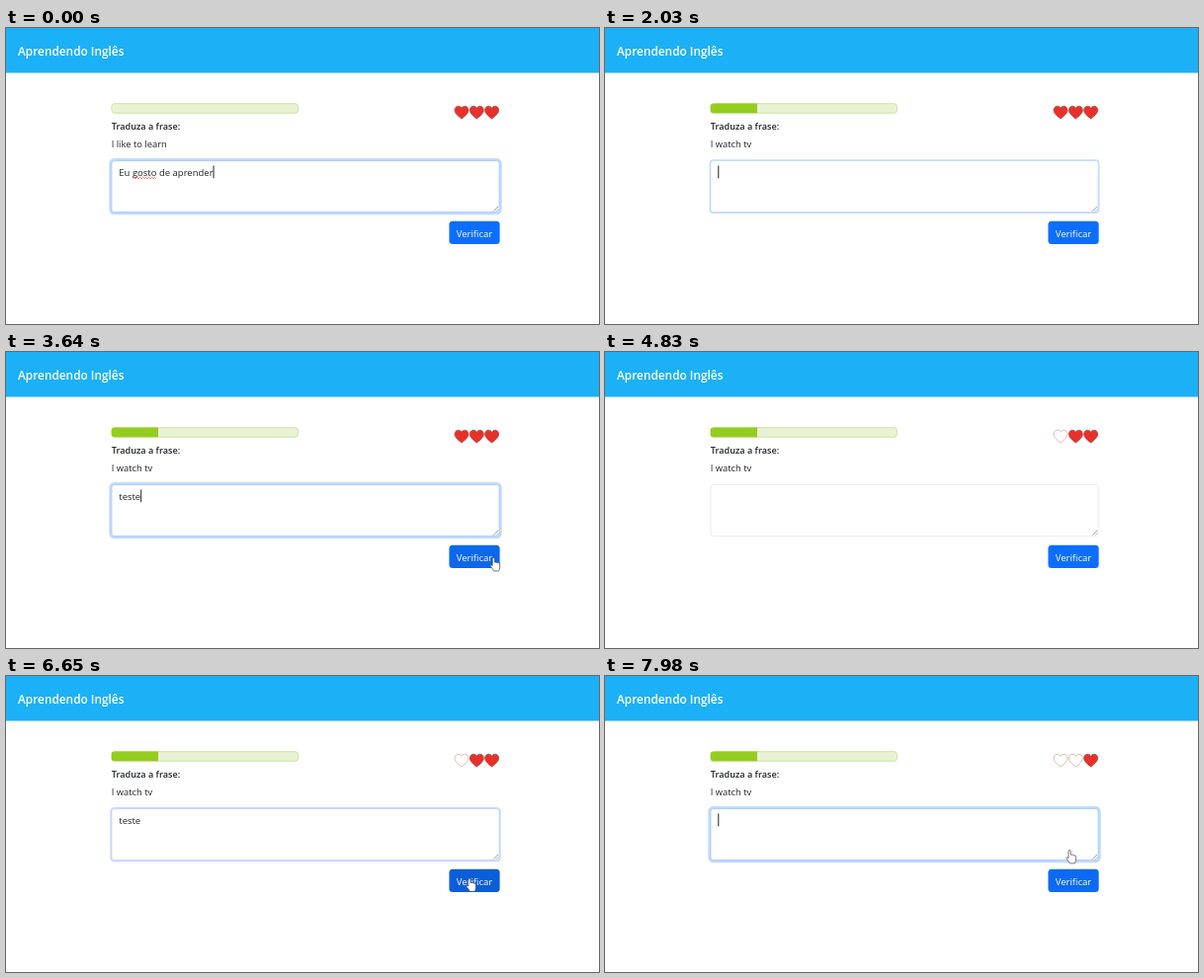
Write an HTML page that moves like this. It is 600 px wide and 300 px high and loops after 8000 ms.

```html
<!DOCTYPE html>
<html lang="pt">
<head>
<meta charset="utf-8">
<title>Aprendendo Inglês</title>
<style>
html, body { margin: 0; width: 100%; height: 100%; overflow: hidden; background: #fff; }
svg { display: block; width: 600px; height: 300px; }
text { font: 9.4px "Open Sans", "Noto Sans", sans-serif; fill: #212529; white-space: pre; }
.title { font-size: 11.85px; font-weight: 600; fill: #fff; }
.label { font-size: 9.15px; font-weight: 600; }
#input { font-size: 9.5px; }
.button { font-size: 9.5px; fill: #fff; text-anchor: middle; }
#pointer path { fill: #fff; stroke: #444; stroke-width: .7; stroke-linejoin: round; }
</style>
</head>
<body>
<svg viewBox="0 0 600 300">
  <defs>
    <path id="heart" d="M0 6.5C-4 3.3-7 .6-7-2.3C-7-4.8-5.2-6.4-3.3-6.4C-1.8-6.4-.6-5.5 0-4.3C.6-5.5 1.8-6.4 3.3-6.4C5.2-6.4 7-4.8 7-2.3C7 .6 4 3.3 0 6.5Z"/>
  </defs>
  <rect width="600" height="45.5" fill="#1cb0f6"/>
  <text class="title" x="12" y="28">Aprendendo Inglês</text>

  <rect x="106.9" y="76.7" width="188.6" height="9.5" rx="3" fill="#e9f3d3" stroke="#c8e29a" stroke-width=".9"/>
  <path id="bar" d="M154 76.4V86.2H109.6Q106.8 86.2 106.8 83.4V79.2Q106.8 76.4 109.6 76.4Z" fill="#94cd1f"/>
  <g id="hearts" stroke-width=".8"></g>

  <text class="label" x="106.7" y="102.7">Traduza a frase:</text>
  <text id="phrase" x="106.7" y="121.2"></text>

  <rect id="ring" x="106.6" y="134.3" width="392.8" height="52.6" rx="3" fill="none" stroke="#c2dbfe"/>
  <rect id="box" x="106.9" y="134.6" width="392.2" height="52" rx="2.6" fill="#fff" stroke-width=".8"/>
  <path d="M493.3 185.6L498 181M496 185.6L498 183.6" stroke="#777" stroke-width=".7"/>
  <text id="input" x="114.3" y="149.8"></text>
  <rect id="caret" y="139.5" width="1" height="12.8" fill="#222"/>
  <path id="squiggle" fill="none" stroke="#e5484d" stroke-width=".8"/>

  <rect id="button" x="448.4" y="195.8" width="51.2" height="23.2" rx="3.5"/>
  <text class="button" x="474" y="211.8">Verificar</text>

  <g id="pointer">
    <path id="arrow" d="M0 0V10.5L2.5 8.2L4 12L5.6 11.3L4 7.6L7.5 7.5Z"/>
    <path id="hand" d="M-1.1 1a1.1 1.1 0 0 1 2.2 0V4.6q1-.6 1.9.2q1.1-.5 1.8.4q1.6-.2 1.6 1.3V9.5q0 1.8-1 3.8H.2q-.8-1.9-3-4.4q-.9-1.2 0-1.6q.8-.4 1.7.7Z"/>
  </g>
</svg>
<script>
const LOOP = 8000, FADE = 150, KEY = 120, BLINK = 530, STEP = 70;
const $ = id => document.getElementById(id);

// Each round: focus the box, type, move from the box to the button, press, send, leave.
const rounds = [
  { focus: -FADE, type: -LOOP, answer: 'Eu gosto de aprender', out: 210, rest: 490,
    press: 490, send: 630, leave: 1750, from: [500, 180], bend: [525, 240], to: [480.5, 213.3] },
  { focus: 1960, type: 2730, answer: 'teste', out: 3290, rest: 3640,
    press: 3850, send: 4200, leave: 4690, from: [500, 160], bend: [590, 180], to: [493.3, 208.6] },
  { focus: 4970, type: 5670, answer: 'teste', out: 6230, rest: 6440,
    press: 6580, send: 6790, leave: 6900, from: [470, 188], bend: [470, 195], to: [469, 205] },
  { focus: 7490, type: LOOP, answer: '', out: LOOP, rest: LOOP, press: LOOP, send: LOOP, leave: LOOP,
    from: [470, 188], bend: [470, 195], to: [469, 205] }
];

const clamp = v => Math.min(1, Math.max(0, v));
const ease = v => v * v * (3 - 2 * v);
const within = (t, a, b) => t >= a && t < b;
const show = (el, on) => el.setAttribute('visibility', on ? 'visible' : 'hidden');
// 0 to 1 after a, back to 0 after b
const pulse = (t, a, b) => ease(clamp((t - a) / FADE)) - ease(clamp((t - b) / FADE));
const total = f => rounds.reduce((sum, r) => sum + f(r), 0);
const mix = (a, b, k) => `rgb(${a.map((v, i) => v + (b[i] - v) * k)})`;

function setText(el, text) {
  if (el.textContent !== text) el.textContent = text;
}

const hearts = [0, 1, 2].map(i => {
  const use = document.createElementNS('http://www.w3.org/2000/svg', 'use');
  use.setAttribute('href', '#heart');
  use.setAttribute('transform', `translate(${461 + 15.3 * i} 85.6)`);
  return $('hearts').appendChild(use);
});
$('squiggle').setAttribute('d', 'M128 152.7' + 'l1.5-1.4l1.5 1.4'.repeat(8));

function drawInput(t, round) {
  const typed = Math.max(0, Math.floor((t - round.type) / KEY) + 1);
  const count = t < round.send ? Math.min(typed, round.answer.length) : 0;
  setText($('input'), round.answer.slice(0, count));

  const lastKey = count ? round.type + (count - 1) * KEY : round.focus;
  const since = t - Math.max(0, round.focus, lastKey);
  const width = count ? $('input').getComputedTextLength() : 0;
  $('caret').setAttribute('x', 114.3 + width);
  show($('caret'), within(t, round.focus, round.press) && since % (2 * BLINK) < BLINK);
}

function drawPointer(t, { out, rest, leave, from, bend, to }) {
  const k = ease(clamp((t - out) / (rest - out || 1))), j = 1 - k;
  const lift = 16 * clamp((t - leave + STEP) / STEP);
  const [x, y] = to.map((v, i) => j * j * from[i] + 2 * j * k * bend[i] + k * k * v);
  $('pointer').setAttribute('transform', `translate(${x} ${y - lift})`);
  const over = within(t, rest - STEP, leave);
  show($('hand'), over);
  show($('arrow'), within(t, out, leave + STEP) && !over);
}

function draw(t) {
  const round = rounds.findLast(r => t >= r.focus);
  const sent = rounds.filter(r => t >= r.send).length;
  const focus = total(r => pulse(t, r.focus, r.press));
  const hover = total(r => pulse(t, r.rest - STEP, r.leave));

  setText($('phrase'), sent ? 'I watch tv' : 'I like to learn');
  show($('bar'), sent > 0);
  show($('squiggle'), sent === 0);
  hearts.forEach((heart, i) => {
    const lost = i < sent - 1;
    heart.setAttribute('fill', lost ? '#fff' : '#e8302a');
    heart.setAttribute('stroke', lost ? '#d9a39f' : '#a8443e');
  });

  $('ring').setAttribute('stroke-width', 4.6 * focus);
  $('box').setAttribute('stroke', mix([230, 232, 235], [156, 196, 253], focus));
  $('button').setAttribute('fill', mix([13, 110, 253], [11, 94, 215], hover));
  drawInput(t, round);
  drawPointer(t, round);
}

let start;
function frame(now) {
  start ??= now;
  draw((now - start) % LOOP);
  requestAnimationFrame(frame);
}
draw(0);
requestAnimationFrame(frame);
</script>
</body>
</html>
```
